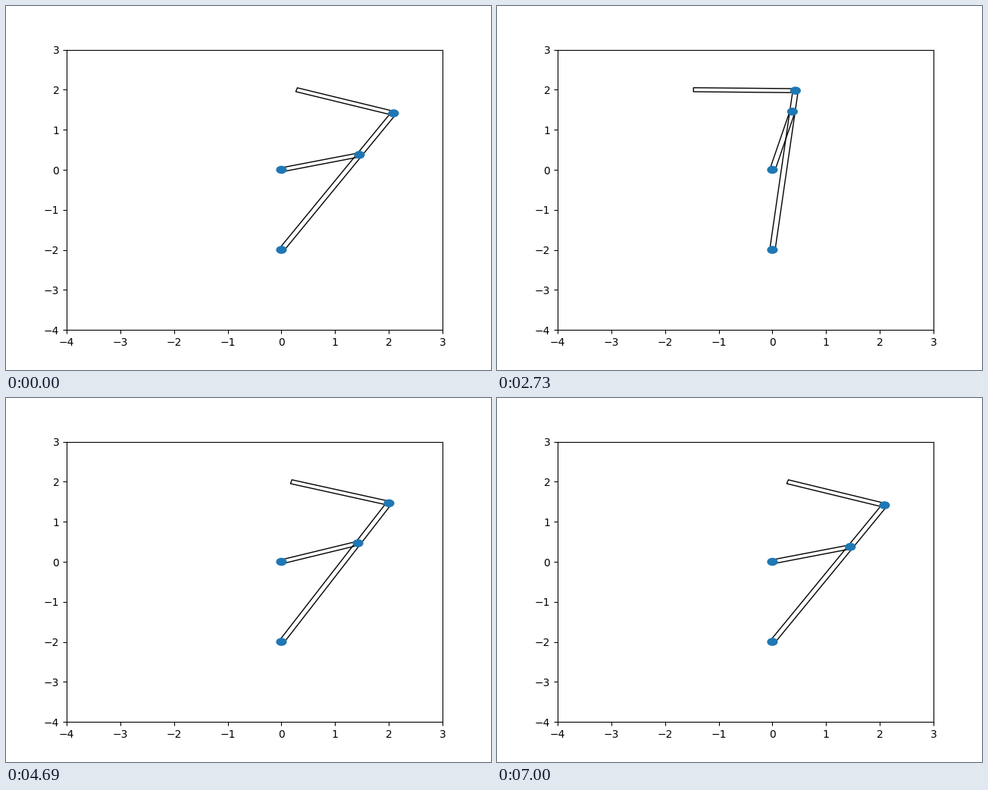
A matplotlib script that plays this animation: 640 px wide and 480 px high, repeating every 7.07 s.

```python
import math

import matplotlib.pyplot as plt
import numpy as np
from matplotlib.animation import FuncAnimation
from matplotlib.patches import Circle, Polygon

CRANK, LEVER, ROD = 1.5, 4.0, 1.9
WIDTH = 0.1
RAM_Y = 2.0
FRAMES, INTERVAL = 101, 70
START, STEP = math.radians(14.4), math.radians(10.8)

ORIGIN = np.array([0.0, 0.0])
PIVOT = np.array([0.0, -2.0])

fig, ax = plt.subplots(figsize=(6.4, 4.8), dpi=100)
ax.set_xlim(-4, 3)
ax.set_ylim(-4, 3)


def direction(angle):
    return np.array([math.cos(angle), math.sin(angle)])


def bar_corners(base, angle, length):
    along = direction(angle)
    side = np.array([-along[1], along[0]]) * WIDTH / 2
    tip = base + along * length
    return [base - side, tip - side, tip + side, base + side]


def pose(i):
    """Solve the quick-return linkage for one crank position."""
    crank = START + STEP * i
    pin = CRANK * direction(crank)
    dx, dy = pin - PIVOT
    lever = math.atan2(dy, dx)
    joint = PIVOT + LEVER * direction(lever)
    rod = math.pi - math.asin((RAM_Y - joint[1]) / ROD)
    bars = [
        bar_corners(ORIGIN, crank, CRANK),
        bar_corners(PIVOT, lever, LEVER),
        bar_corners(joint, rod, ROD),
    ]
    return bars, pin, joint


def add_bar():
    return ax.add_patch(Polygon(np.zeros((4, 2)), closed=True, fill=False))


def add_dot(center):
    return ax.add_patch(Circle(center, 0.1, zorder=1.1))


bars = [add_bar() for _ in range(3)]
add_dot(ORIGIN)
add_dot(PIVOT)
pin_dot = add_dot(ORIGIN)
joint_dot = add_dot(ORIGIN)


def update(i):
    corners, pin, joint = pose(i)
    for bar, xy in zip(bars, corners):
        bar.set_xy(xy)
    pin_dot.center = pin
    joint_dot.center = joint
    return [*bars, pin_dot, joint_dot]


anim = FuncAnimation(fig, update, frames=FRAMES, interval=INTERVAL,
                     repeat=True, repeat_delay=0, blit=False)
plt.show()
```
